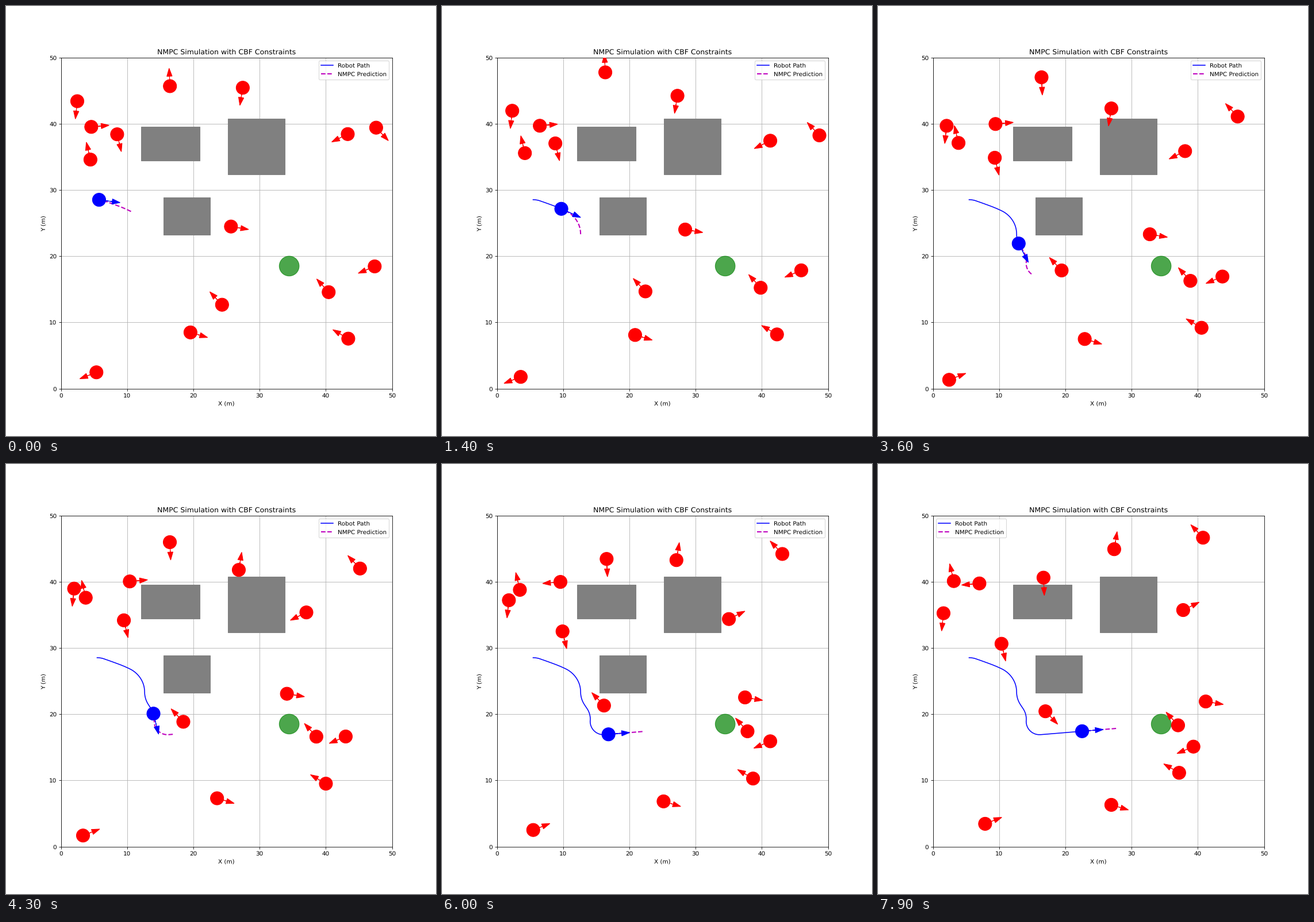
Write a matplotlib script that moves like this. It is 748 px wide and 748 px high and loops after 8 s.

```python
import numpy as np
import matplotlib.pyplot as plt
from matplotlib.animation import FuncAnimation
from matplotlib.patches import Circle, FancyArrow, Rectangle

FRAMES, INTERVAL = 80, 100
SIZE, SIDE = 748, 575.96    # stage and axes in pixels
FIELD, RADIUS = 50, 1
STEP, HORIZON = 0.3, 19     # robot metres per frame, predicted steps
LEGEND_MOVE = 64            # frame at which the legend gets out of the way

# start x, y and velocity per frame
OBSTACLES = [
    (2.465, 43.41, -0.0110, -0.1033),
    (4.583, 39.53, 0.1352, 0.0121),
    (8.49, 38.41, 0.0236, -0.0984),
    (4.453, 34.59, -0.0165, 0.0698),
    (16.46, 45.68, -0.0069, 0.1488),
    (27.46, 45.44, -0.0143, -0.0868),
    (43.31, 38.44, -0.1453, -0.0714),
    (47.60, 39.41, 0.1217, -0.1294),
    (25.68, 24.48, 0.1964, -0.0324),
    (47.38, 18.46, -0.1018, -0.0425),
    (40.43, 14.57, -0.0432, 0.0475),
    (24.33, 12.67, -0.1360, 0.1439),
    (19.56, 8.49, 0.0934, -0.0276),
    (43.39, 7.55, -0.0786, 0.0456),
    (5.356, 2.465, -0.1262, -0.0491),
]
WALLS = [(12.10, 34.46, 8.90, 5.07), (25.18, 32.31, 8.62, 8.43), (15.45, 23.20, 7.09, 5.65)]

# robot steering: clockwise heading in degrees at a few steps
TURN_AT = [0, 3, 11, 17, 25, 31.5, 38, 40.5, 47, 58.5]
TURN_TO = [2, 19, 20.5, 26, 60, 90, 58, 55, 94, -4.7]


def blocked(p):
    """True where a disc at p leaves the field or touches a wall."""
    if p.min() < RADIUS or p.max() > FIELD - RADIUS:
        return True
    return any(x - RADIUS < p[0] < x + w + RADIUS and y - RADIUS < p[1] < y + h + RADIUS
               for x, y, w, h in WALLS)


def bounce(x, y, vx, vy):
    """Position and velocity per frame; a blocked disc waits one frame and turns back."""
    pos, vel = np.array([x, y]), np.array([vx, vy])
    track = []
    for _ in range(FRAMES):
        track.append((pos, vel))
        if blocked(pos + vel):
            vel = -vel
        else:
            pos = pos + vel
    return track


def drive(start, count):
    """Constant-speed route that follows the steering."""
    angle = -np.radians(np.interp(np.arange(count), TURN_AT, TURN_TO))
    heading = np.column_stack([np.cos(angle), np.sin(angle)])
    return start + STEP * np.cumsum(heading, axis=0) - STEP * heading, heading


class Agent:
    """Disc with a heading arrow."""

    def __init__(self, color, shaft):
        self.shaft = shaft
        self.disc = ax.add_patch(Circle((0, 0), RADIUS, color=color, zorder=3))
        self.arrow = ax.add_patch(FancyArrow(0, 0, 1, 0, width=0.001, head_width=0.8,
                                             head_length=1.2, color=color, zorder=3))

    def place(self, pos, heading):
        dx, dy = self.shaft * heading / np.hypot(*heading)
        self.disc.center = tuple(pos)
        self.arrow.set_data(x=pos[0], y=pos[1], dx=dx, dy=dy)


tracks = [bounce(*o) for o in OBSTACLES]
route, headings = drive(np.array([5.46, 28.53]), FRAMES + HORIZON + 1)

plt.rcParams["text.hinting"] = "none"
fig = plt.figure(figsize=(10, 10), dpi=SIZE / 10)
ax = fig.add_axes([95.57 / SIZE, 82.38 / SIZE, SIDE / SIZE, SIDE / SIZE])
ax.set(xlim=(0, FIELD), ylim=(0, FIELD), xlabel="X (m)", ylabel="Y (m)",
       title="NMPC Simulation with CBF Constraints")
ax.grid(True)

for x, y, w, h in WALLS:
    ax.add_patch(Rectangle((x, y), w, h, color="gray", zorder=2))
ax.add_patch(Circle((34.47, 18.51), 1.5, color="green", alpha=0.7, zorder=2.4))
path, = ax.plot([], [], "b-", label="Robot Path")
plan, = ax.plot([], [], "m--", lw=2, label="NMPC Prediction")
legend = ax.legend(loc="upper right")
obstacles = [Agent("red", 1.5) for _ in tracks]
robot = Agent("blue", 2.0)


def update(n):
    for agent, track in zip(obstacles, tracks):
        agent.place(*track[n])
    robot.place(route[n + 1], headings[n + 1])
    path.set_data(*route[:n + 2].T)
    plan.set_data(*route[n:n + HORIZON + 1].T)
    legend.set_loc("upper right" if n < LEGEND_MOVE else "upper left")
    return []


anim = FuncAnimation(fig, update, frames=FRAMES, interval=INTERVAL,
                     repeat=True, repeat_delay=0, blit=False)
plt.show()
```
